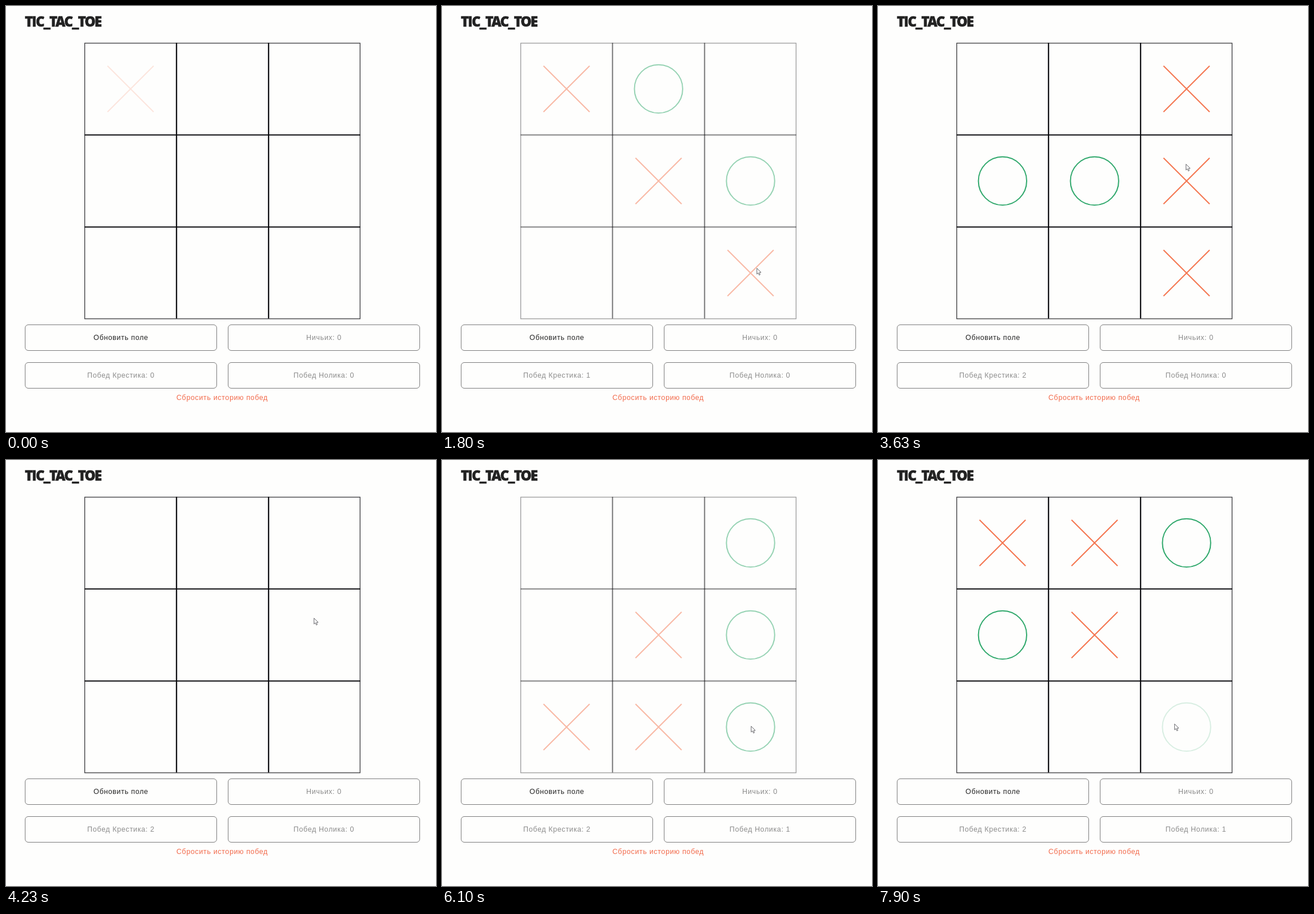
Animation, 752 px wide and 745 px high, one loop 8 s. Source, as an HTML page with a canvas:

```html
<!DOCTYPE html>
<html lang="ru">
<head>
<meta charset="utf-8">
<title>TIC_TAC_TOE</title>
<style>
  html, body { margin: 0; width: 100%; height: 100%; overflow: hidden; background: #fefefd; }
  body { position: relative; font: 12.5px/16px "Liberation Sans", Arial, sans-serif; letter-spacing: .05em; }
  canvas { position: absolute; left: 0; top: 0; }
  h1 {
    position: absolute; left: 33px; top: 11px; margin: 0; white-space: nowrap; color: #222;
    font: 800 24px/32px Impact, "Open Sans", sans-serif; font-stretch: 75%;
    letter-spacing: 0; -webkit-text-stroke: .5px #222;
  }
  .box {
    position: absolute; box-sizing: border-box; width: 336px; height: 46px;
    border: 1px solid #7c7c7c; border-radius: 6px;
    line-height: 44px; text-align: center; color: #8b8b8b;
  }
  .left { left: 33px; }
  .right { left: 388px; }
  .upper { top: 557px; }
  .lower { top: 623px; }
  .action { color: #222; }
  .reset { position: absolute; left: 0; top: 677px; width: 756px; text-align: center; color: #f26a4b; }
</style>
</head>
<body>
<h1>TIC_TAC_TOE</h1>
<div class="box left upper action">Обновить поле</div>
<div class="box right upper">Ничьих: 0</div>
<div class="box left lower">Побед Крестика: <span id="crossWins">0</span></div>
<div class="box right lower">Побед Нолика: <span id="noughtWins">0</span></div>
<div class="reset">Сбросить историю побед</div>
<canvas id="stage" width="752" height="745"></canvas>
<script>
const LOOP = 8000;
const FADE = 60;
const DIM = 0.5;
const BOARD = { x: 137.5, y: 64.5, size: 482, cell: 160.8 };
const COLORS = ['#f4754f', '#2fa86b'];

// Pointer route: time, x, y
const ROUTE = [
  [160, 205, 150], [400, 225, 158], [640, 320, 168], [960, 386, 212], [1000, 386, 212],
  [1060, 392, 290], [1230, 392, 290], [1360, 520, 300], [1560, 520, 300],
  [1740, 550, 458], [2130, 550, 458], [2430, 703, 470], [2730, 574, 455], [2810, 568, 452],
  [3010, 225, 310], [3190, 530, 150], [3310, 395, 300], [3430, 538, 276], [4230, 538, 276],
  [4460, 400, 300], [4740, 520, 300], [4990, 390, 460], [5260, 530, 150], [5300, 530, 152],
  [5560, 494, 441], [5680, 225, 470], [5840, 540, 465], [6230, 540, 465],
  [6660, 256, 216], [6750, 230, 170], [6930, 222, 300], [7060, 330, 245], [7230, 375, 150],
  [7440, 530, 140], [7680, 385, 300], [7860, 519, 463], [7900, 518, 461]
];

// Each game starts at `from`; hovering works from `wake` on
const GAMES = [
  { from: 0, wake: 0, clicks: [160, 1000, 1230, 1560, 1740], won: true },
  { from: 2130, wake: 2750, clicks: [2810, 3010, 3190, 3310, 3630], won: true },
  { from: 4020, wake: 4260, clicks: [4460, 4740, 4990, 5260, 5680, 5840], won: true },
  { from: 6230, wake: 6330, clicks: [6750, 6930, 7230, 7440, 7680], won: false }
];

const ctx = document.getElementById('stage').getContext('2d');
const clamp = v => Math.max(0, Math.min(1, v));
const smooth = v => v * v * (3 - 2 * v);

function pointer(t) {
  const i = ROUTE.findIndex(p => p[0] > t);
  if (i === 0) return ROUTE[0].slice(1);
  if (i < 0) return ROUTE[ROUTE.length - 1].slice(1);
  const [t0, x0, y0] = ROUTE[i - 1], [t1, x1, y1] = ROUTE[i];
  const k = smooth((t - t0) / (t1 - t0));
  return [x0 + (x1 - x0) * k, y0 + (y1 - y0) * k];
}

function cellAt([x, y]) {
  const col = Math.floor((x - BOARD.x) / BOARD.cell);
  const row = Math.floor((y - BOARD.y) / BOARD.cell);
  return col < 0 || col > 2 || row < 0 || row > 2 ? -1 : row * 3 + col;
}

for (const game of GAMES) {
  game.cells = game.clicks.map(t => cellAt(pointer(t)));
  game.end = game.won ? game.clicks[game.clicks.length - 1] : Infinity;
}

function line(x0, y0, x1, y1) {
  ctx.beginPath();
  ctx.moveTo(x0, y0);
  ctx.lineTo(x1, y1);
  ctx.stroke();
}

function drawGrid() {
  const { x, y, size } = BOARD;
  ctx.strokeStyle = '#26262a';
  ctx.lineWidth = 1.2;
  ctx.strokeRect(x + 0.2, y + 0.5, size - 0.5, size);
  ctx.strokeStyle = '#08080c';
  ctx.lineWidth = 2.2;
  for (let i = 1; i < 3; i++) {
    const d = 161 * i;
    line(x - 0.3 + d, y, x - 0.3 + d, y + size);
    line(x, y + d, x + size, y + d);
  }
}

function drawMark(cell, side, alpha) {
  const x = 217.8 + 160.9 * (cell % 3);
  const y = 145 + 161 * Math.floor(cell / 3);
  const r = 40.3;
  ctx.globalAlpha = alpha;
  ctx.strokeStyle = COLORS[side];
  ctx.lineWidth = 2;
  ctx.beginPath();
  if (side) {
    ctx.arc(x, y, 42.2, 0, 2 * Math.PI);
  } else {
    ctx.moveTo(x - r, y - r);
    ctx.lineTo(x + r, y + r);
    ctx.moveTo(x + r, y - r);
    ctx.lineTo(x - r, y + r);
  }
  ctx.stroke();
}

function drawPointer([x, y]) {
  ctx.save();
  ctx.translate(x + 0.7, y + 0.6);
  ctx.beginPath();
  for (const [px, py] of [[0, 0], [0, 10.2], [2.3, 8.2], [4, 12], [5.7, 11.2], [4.1, 7.6], [7.3, 7.4]]) ctx.lineTo(px, py);
  ctx.closePath();
  ctx.fillStyle = '#fff';
  ctx.fill();
  ctx.strokeStyle = '#55555a';
  ctx.lineWidth = 0.9;
  ctx.stroke();
  ctx.restore();
}

function boardAlpha(t) {
  let dim = 0;
  for (let i = 0; i < GAMES.length - 1; i++) {
    dim += clamp((t - GAMES[i].end) / FADE) - clamp((t - GAMES[i + 1].from) / FADE);
  }
  return 1 - dim * (1 - DIM);
}

function render(t) {
  const game = GAMES.filter(g => t >= g.from).pop();
  const placed = game.clicks.filter(c => c <= t).length;
  const spot = pointer(t);
  const hover = cellAt(spot);
  const alpha = boardAlpha(t);

  ctx.clearRect(0, 0, 752, 745);
  ctx.globalAlpha = alpha;
  drawGrid();
  const taken = game.cells.slice(0, placed);
  taken.forEach((cell, i) => drawMark(cell, i % 2, alpha));
  if (hover >= 0 && t >= game.wake && t < game.end && !taken.includes(hover)) {
    drawMark(hover, placed % 2, 0.18);
  }
  ctx.globalAlpha = 1;
  if (t >= 160) drawPointer(spot);

  const wins = [0, 0];
  for (const g of GAMES) if (t >= g.end) wins[(g.clicks.length - 1) % 2]++;
  document.getElementById('crossWins').textContent = wins[0];
  document.getElementById('noughtWins').textContent = wins[1];
}

// Track the heading evenly, whichever heavy face is present
const title = document.querySelector('h1');
title.style.letterSpacing = (134 - title.offsetWidth) / 10.5 + 'px';

const start = performance.now();
function tick() {
  render((performance.now() - start) % LOOP);
  requestAnimationFrame(tick);
}
tick();
</script>
</body>
</html>
```
